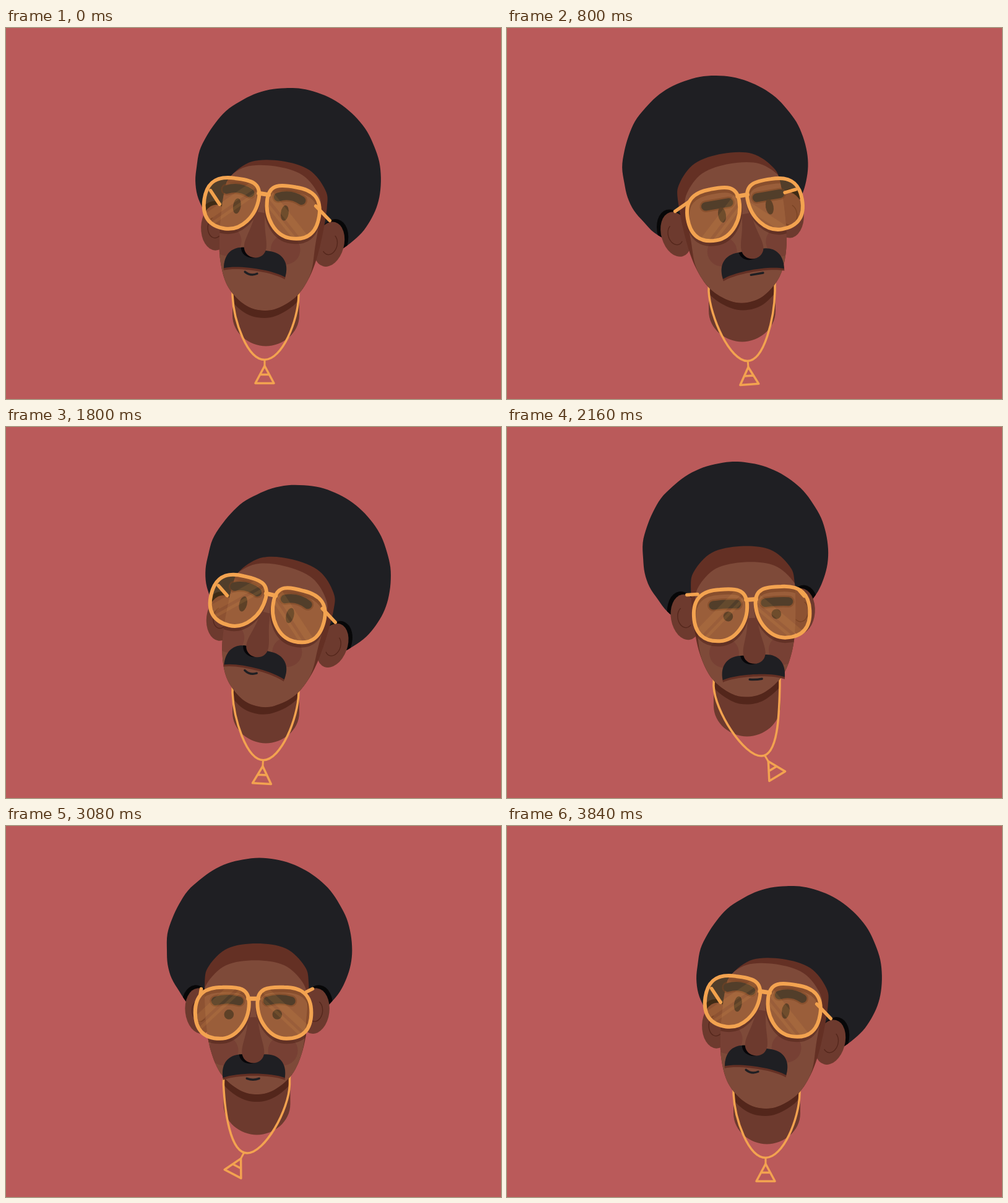
Recreate the animation shown at these times as an HTML page with a canvas. Size 800x600 px, loop 3880 ms.

```html
<!DOCTYPE html>
<html lang="en">
<head>
<meta charset="utf-8">
<title>Head bob</title>
<style>
html, body { margin: 0; height: 100%; overflow: hidden; background: #ba5a5a; }
canvas { display: block; }
</style>
</head>
<body>
<canvas id="stage" width="800" height="600"></canvas>
<script>
const g = document.getElementById('stage').getContext('2d');
const LOOP = 3880, STEP = 40, SWAY = 1920, BEAT = 480, TURN = 340, TAU = Math.PI * 2;
const HAIR = '#1f1f23', SKIN = '#7e4a39', SHADE = '#643024', BROWN = '#6d3a2e',
      DEEP = '#53261b', GOLD = '#f3a350';

// Head tilt in degrees, one key per 160 ms of the sway.
const TILT = [8.4, 2.5, -8.2, -12.3, -13, -9.7, -8.2, -2, 6, 9.5, 13.8, 15];
// Pendant swing, one key per 80 ms; the second half of the sway mirrors the first.
const half = [0, 6, 20, 31, 10, -16, -20, -12, -2, 4, 4, 2];
const SWING = half.concat(half.map(v => -v));
// Right half of the face: [half width, height].
const FACE = [[0, -179], [47, -171], [77, -143], [84, -115], [82, -52], [74, -5], [57, 33], [28, 58], [0, 65]];

function spline(keys, t) {
  const i = Math.floor(t), f = t - i, n = keys.length;
  const [a, b, c, d] = [-1, 0, 1, 2].map(k => keys[(i + k + n) % n]);
  return b + f / 2 * (c - a + f * (2 * a - 5 * b + 4 * c - d + f * (3 * (b - c) + d - a)));
}

function sway(t) {
  const p = t % (SWAY / 2), side = t < SWAY / 2 ? 1 : -1;
  return side * (p < TURN ? Math.cos(Math.PI * p / TURN) : -1);
}

function blob(pts) {
  const path = new Path2D(), n = pts.length, at = i => pts[(i + n) % n];
  path.moveTo(...pts[0]);
  for (let i = 0; i < n; i++) {
    const [a, b, c, d] = [at(i - 1), at(i), at(i + 1), at(i + 2)];
    path.bezierCurveTo(b[0] + (c[0] - a[0]) / 6, b[1] + (c[1] - a[1]) / 6,
      c[0] - (d[0] - b[0]) / 6, c[1] - (d[1] - b[1]) / 6, c[0], c[1]);
  }
  path.closePath();
  return path;
}

const mirrored = pts => pts.concat(pts.slice(1, -1).reverse().map(([x, y]) => [-x, y]));

function ellipse(x, y, rx, ry, turn = 0) {
  const path = new Path2D();
  path.ellipse(x, y, rx, ry, turn, 0, TAU);
  return path;
}

function fill(path, color) {
  g.fillStyle = color;
  g.fill(path);
}

function stroke(path, color, width) {
  g.strokeStyle = color;
  g.lineWidth = width;
  g.stroke(typeof path === 'string' ? new Path2D(path) : path);
}

function group(draw, x = 0, y = 0, turn = 0, flip = 1) {
  g.save();
  g.translate(x, y);
  g.rotate(turn);
  g.scale(flip, 1);
  draw();
  g.restore();
}

function clipped(path, draw) {
  g.save();
  g.clip(path);
  draw();
  g.restore();
}

const hairShape = blob(Array.from({ length: 36 }, (_, i) => {
  const a = i / 36 * TAU, r = 149 + 0.5 * Math.sin(i * 2.4) + 0.4 * Math.sin(i * 4.1);
  const y = r * Math.sin(a);
  return [r * Math.cos(a) * 1.007, y > 0 ? y * 0.9 : y];
}));
const lensShape = new Path2D('M-44 0C-44-30-28-41 0-41C26-42 43-40 43-15C43 15 22 42-4 42C-30 42-44 28-44 0Z');
const moustache = new Path2D('M-50 6C-54-18-40-32-20-32L20-32C40-32 54-18 50 6C28-3-28-3-50 6Z');
const nose = new Path2D('M-8-92C-9-65-18-50-18-36C-18-12 18-12 18-36C18-50 9-65 8-92Z');

const earX = (side, s) => 18 * s + side * 92.5;
const earY = lift => -57 - 42 * lift;
const lensX = (side, s) => -5.8 * s + side * 49.8;

function drawEar(side, s, lift) {
  group(() => {
    fill(ellipse(0, 0, 24, 37, 0.12), BROWN);
    const fold = new Path2D();
    fold.ellipse(1, 0, 12, 17, 0.1, -1.1, 2.2);
    stroke(fold, DEEP, 1.3);
  }, earX(side, s), earY(lift), 0, side);
}

function drawHair(s, lift) {
  const x = 29.8 * s, y = -150 - 47 * lift;
  group(() => {
    fill(hairShape, HAIR);
    clipped(hairShape, () => {
      for (const side of [-1, 1])
        fill(ellipse(earX(side, s) + side * 4.5 - x, earY(lift) - 5 - y, 25, 37, side * 0.12), '#070708');
    });
  }, x, y);
}

function drawLens(side, s, lift) {
  group(() => {
    fill(lensShape, 'rgba(240,160,65,.24)');
    clipped(lensShape, () => group(() => {
      const y = 4 - 14 * s - 24 * lift + (side > 0 ? 14 : 0);
      g.fillStyle = 'rgba(240,170,80,.11)';
      g.fillRect(-60, y, 120, 12);
      g.fillRect(-60, y + 17, 120, 5);
    }, 0, 0, -0.75, -side));
    stroke(lensShape, GOLD, 6);
  }, lensX(side, s), -99.5, 0, -side);
}

function drawFace(s, dip, face, skin) {
  fill(face, SHADE);
  clipped(face, () => {
    fill(skin, SKIN);
    for (const side of [-1, 1])
      fill(ellipse(-6 * s + side * 48, -38, 24, 24), 'rgba(104,46,42,.32)');
    // Soft shadow of the glasses
    for (const side of [-1, 1])
      group(() => stroke(lensShape, 'rgba(83,38,27,.55)', 6), lensX(side, s), -94, 0, -side);
  });

  for (const side of [-1, 1]) {
    const x = -5 * s + side * 42, y = -119 - 4.5 * s, bend = 3 + 3 * s;
    const brow = `M${x - 19} ${y + bend / 2}Q${x} ${y - bend} ${x + 19} ${y + bend / 2}`;
    stroke(brow, 'rgba(83,38,27,.5)', 19);
    stroke(brow, HAIR, 14);
    fill(ellipse(-6.8 * s + side * 39, -96.5, 6.3 + 1.5 * dip, 12.5 - 4.5 * dip), '#2f2320');
  }

  group(() => fill(moustache, SHADE), -2 * s, 3.5);
  group(() => {
    fill(moustache, HAIR);
    clipped(moustache, () => group(() => fill(nose, '#070609'), -5 * s - 5, 1));
  }, -2 * s, 0);
  group(() => fill(nose, BROWN), -7 * s, 0);
  const x = -7.5 * s;
  stroke(`M${x - 10} 7Q${x} ${10 + 3 * s} ${x + 10} 7`, HAIR, 3.4);
}

function drawGlasses(s, lift) {
  for (const side of [-1, 1]) {
    const hingeY = -115 - lift * (14 + 10 * side * s);
    stroke(`M${-5.8 * s + side * 86} ${hingeY}L${16 * s + side * 90} ${-95 - 40 * lift}`, GOLD, 5.5);
  }
  for (const side of [-1, 1]) drawLens(side, s, lift);
  stroke(`M${-5.8 * s - 8} -122H${-5.8 * s + 8}`, GOLD, 7);
}

function drawNecklace(x, y, dropX, dropY, swing) {
  stroke(`M${x - 53} ${y - 112}L${x - 54} ${y - 82}` +
    `C${x - 52} ${y - 40} ${dropX - 28} ${dropY} ${dropX} ${dropY}` +
    `S${x + 52} ${y - 40} ${x + 53} ${y - 82}V${y - 112}`, GOLD, 3.5);
  group(() => {
    stroke('M0 0V10', GOLD, 3);
    stroke('M0 10L-15 38H15ZM-7 24H7', GOLD, 3.5);
  }, dropX + 0.2 * swing, dropY, -swing * Math.PI / 180);
}

function draw(time) {
  const t = time % SWAY;
  const s = sway(t);
  const bob = Math.cos(TAU * (t + 40) / BEAT);
  const lift = 0.5 - 0.575 * bob;
  const dip = Math.min(1, 1.6 * (1 - s * s));
  const tilt = spline(TILT, t / 160) * Math.PI / 180;
  const swing = spline(SWING, t / 80);

  const neckX = 400 + 20 * s, neckY = 507.5 + 8 * bob;
  const dropX = neckX + 0.6 * swing + 2 - 4 * s;
  const dropY = 534.5 - s + 6 * Math.cos(TAU * (t - 400) / BEAT);
  const neck = new Path2D(`M${neckX - 54} ${neckY - 130}V${neckY - 50}` +
    `C${neckX - 54} ${neckY - 21} ${neckX - 27} ${neckY} ${neckX} ${neckY}` +
    `S${neckX + 54} ${neckY - 21} ${neckX + 54} ${neckY - 50}V${neckY - 130}Z`);

  const outline = mirrored(FACE);
  const face = blob(outline.map(([x, y]) => [x + 14.5 * s, y - 30 * lift]));
  // The lit skin pulls away from the near side of the forehead and temple.
  const skin = blob(outline.map(([x, y]) => {
    const inset = 9 * Math.max(0, Math.min(1, -y / 60));
    return [x + (14.5 - inset) * s, y < -100 ? y + 10 - 14 * lift : y - 30 * lift];
  }));
  const inHead = paint => group(paint, 400 + 4.5 * s, 390 + 4 * lift + 7 * dip, tilt);

  g.fillStyle = '#ba5a5a';
  g.fillRect(0, 0, 800, 600);
  g.lineCap = g.lineJoin = 'round';

  fill(neck, BROWN);
  clipped(neck, () => inHead(() => group(() => fill(face, DEEP), 0, 12)));
  drawNecklace(neckX, neckY, dropX, dropY, swing);

  inHead(() => {
    drawHair(s, lift);
    drawEar(-1, s, lift);
    drawEar(1, s, lift);
    drawFace(s, dip, face, skin);
    drawGlasses(s, lift);
  });
}

function frame(now) {
  draw(Math.floor(now % LOOP / STEP) * STEP);
  requestAnimationFrame(frame);
}
requestAnimationFrame(frame);
</script>
</body>
</html>
```
